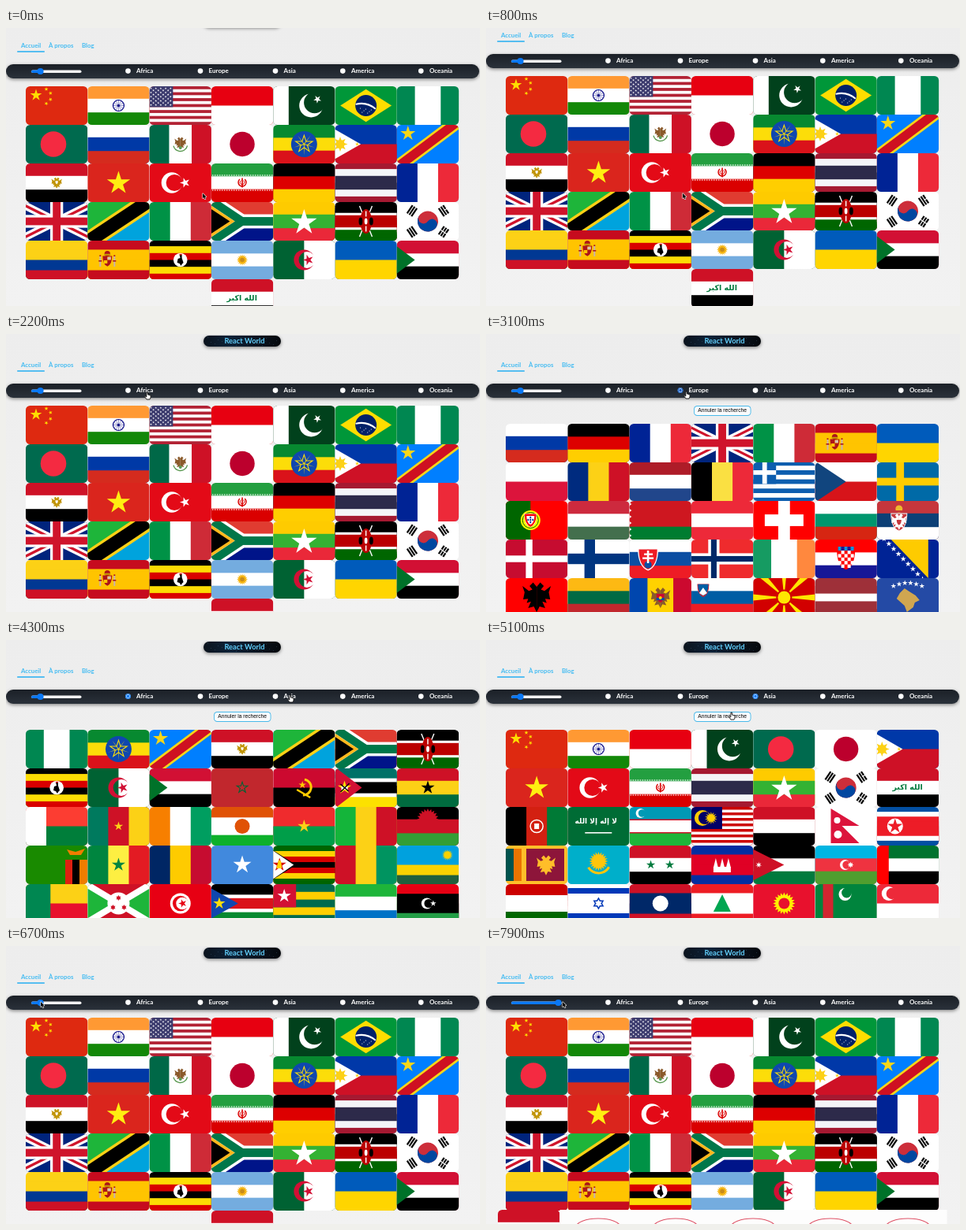
An HTML page with a canvas that plays this animation: 600 by 353 pixels, repeating every 8 s.

```html
<!DOCTYPE html>
<html lang="fr">
<head>
<meta charset="utf-8">
<title>React World</title>
<style>
html, body { margin: 0; width: 100%; height: 100%; overflow: hidden; background: #efefef; }
canvas { display: block; }
</style>
</head>
<body>
<canvas id="stage" width="600" height="353"></canvas>
<script>
const g = document.getElementById('stage').getContext('2d');
const W = 78.3, H = 49, CX = W / 2, CY = H / 2, LOOP = 8000;

// ---------- drawing helpers (colours are hex without '#') ----------
const ink = c => { g.fillStyle = '#' + c; };
const rect = (c, x, y, w, h) => { ink(c); g.fillRect(x, y, w, h); };
const fill = c => rect(c, 0, 0, W, H);
function disc(c, x, y, r) { ink(c); g.beginPath(); g.arc(x, y, r, 0, 7); g.fill(); }
function path(p) {
  g.beginPath();
  for (let i = 0; i < p.length; i += 2) g.lineTo(p[i], p[i + 1]);
}
function poly(c, ...p) { ink(c); path(p); g.fill(); }
function line(c, w, ...p) { g.strokeStyle = '#' + c; g.lineWidth = w; path(p); g.stroke(); }
function ring(c, w, x, y, r, a = 0, b = 7) {
  g.strokeStyle = '#' + c; g.lineWidth = w;
  g.beginPath(); g.arc(x, y, r, a, b); g.stroke();
}
function star(c, x, y, r, n = 5, k = .38, turn = 0) {
  const p = [];
  for (let i = 0; i < 2 * n; i++) {
    const a = turn - Math.PI / 2 + i * Math.PI / n, q = i % 2 ? r * k : r;
    p.push(x + q * Math.cos(a), y + q * Math.sin(a));
  }
  poly(c, ...p);
}
// a flag of the given ratio, centred so that it covers the card
function cover(ratio) {
  const w = Math.max(W, H * ratio), h = w / ratio;
  return { x: (W - w) / 2, y: (H - h) / 2, w, h };
}
function bands(s, across, ratio = 1.5) {
  const f = cover(ratio);
  s.split(' ').forEach((c, i, a) => {
    const p = i / a.length;
    rect(c, across ? f.x + p * f.w : 0, across ? 0 : f.y + p * f.h, f.w, f.h);
  });
}
const rows = (s, ratio) => bands(s, false, ratio), cols = (s, ratio) => bands(s, true, ratio);
function tri(c, tip, ratio = 1.5, inset = 0) {
  const f = cover(ratio);
  poly(c, f.x, f.y + inset, tip, CY, f.x, f.y + f.h - inset);
}
const cross = (c, w, x) => { rect(c, x - w / 2, 0, w, H); rect(c, 0, CY - w / 2, W, w); };
const slash = (c, w, ratio = 1.5, up = 1) => line(c, w, CX - 60, CY + up * 60 / ratio, CX + 60, CY - up * 60 / ratio);
function moon(c, x, y, r, dx, dy = 0, k = .8) {
  g.save();
  g.beginPath(); g.arc(x, y, r, 0, 7); g.clip();
  g.beginPath(); g.rect(0, 0, W, H); g.arc(x + dx, y + dy, r * k, 0, 2 * Math.PI);
  ink(c); g.fill('evenodd');
  g.restore();
}
function shield(c, x, y, r) {
  ink(c); g.beginPath(); g.moveTo(x - r, y - r); g.lineTo(x + r, y - r);
  g.quadraticCurveTo(x + r, y + r * .8, x, y + r * 1.2);
  g.quadraticCurveTo(x - r, y + r * .8, x - r, y - r); g.fill();
}
function eagle(c, x, y, r) {
  const half = [0, -.7, .25, -1, .5, -.75, .3, -.5, .55, -.4, 1, -.75, .85, -.3, .95, .2, .6, .15, .7, .45, .4, .35, .6, .8, .2, .7, 0, 1.1];
  for (const s of [-1, 1]) poly(c, ...half.map((v, i) => i % 2 ? y + v * r : x + s * v * r));
}
function script(s, c, y, size) {
  ink(c); g.font = `bold ${size}px "DejaVu Sans", sans-serif`;
  g.textAlign = 'center'; g.textBaseline = 'middle'; g.fillText(s, CX, y);
}
function taegeuk(r) {
  g.save(); g.translate(CX, CY); g.rotate(.588);
  disc('cd2e3a', 0, 0, r);
  ink('0047a0'); g.beginPath(); g.arc(0, 0, r, 0, Math.PI); g.fill();
  disc('cd2e3a', -r / 2, 0, r / 2); disc('0047a0', r / 2, 0, r / 2);
  g.restore();
  for (const sx of [-1, 1]) for (const sy of [-1, 1]) {
    g.save(); g.translate(CX + sx * 20, CY + sy * 13.4); g.rotate(sx * sy * -.98);
    for (const d of [-3.3, 0, 3.3]) rect('000', -6.2, d - 1.1, 12.4, 2.2);
    if (sx > 0) rect('fff', -.6, -5, 1.2, sy > 0 ? 10 : 4);
    g.restore();
  }
}
function unionJack() {
  fill('00247d');
  for (const [c, w] of [['fff', 9.8], ['cf142b', 3.3]]) { slash(c, w, 2); slash(c, w, 2, -1); }
  cross('fff', 16.3, CX); cross('cf142b', 9.8, CX);
}
function southAfrica() {
  rows('e03c31 001489');
  for (const [c, w] of [['fff', 17.4], ['007749', 10.4]]) {
    line(c, w, -12, -9.6, CX, CY, W, CY); line(c, w, -12, H + 9.6, CX, CY, W, CY);
  }
  tri('ffb81c', 29.7, 1.5, 6.3); tri('000', 23.5, 1.5, 10.5);
}
function usa() {
  rows('b22234 fff b22234 fff b22234 fff b22234 fff b22234 fff b22234 fff b22234', 1.9);
  rect('3c3b6e', 0, 0, 29.8, 26.4);
  for (let j = 0; j < 9; j++) for (let i = j % 2; i < 11; i += 2)
    star('fff', i * 3.1 - 4.3, 2.64 * (j + 1), 1.5);
}
function mozambique() {
  rows('007168 007168 007168 fff 000 000 000 fff fce100 fce100 fce100');
  tri('d21034', 34); star('fce100', 12, CY, 9);
  rect('fff', 8, 23, 8, 4); line('000', 1.3, 7, 30, 18, 19); line('000', 1.3, 7, 20, 17, 29);
}
function kenya() {
  rows('000 000 000 000 000 fff b00 b00 b00 b00 b00 fff 060 060 060 060 060');
  line('fff', 1.4, 31, 5, 47, 44); line('fff', 1.4, 47, 5, 31, 44);
  g.save(); g.translate(CX, CY); g.scale(.48, 1);
  disc('b00', 0, 0, 15.5); disc('000', -14, 0, 5); disc('000', 14, 0, 5);
  rect('fff', -1.5, -13, 3, 7); rect('fff', -1.5, 6, 3, 7); disc('fff', 0, 0, 4);
  g.restore();
}
function croatia() {
  rows('f00 fff 171796', 2); shield('f00', CX, CY, 11.5);
  for (let i = 1; i < 25; i += 2) rect('fff', CX - 10 + i % 5 * 4, 14 + (i / 5 | 0) * 4.4, 4, 4.4);
  for (let i = 0; i < 5; i++) rect(i % 2 ? '171796' : '0093dd', CX - 10 + i * 4, 9, 4, 5);
}
function macedonia() {
  fill('d20000');
  for (let i = 0; i < 8; i++) {
    const a = i * Math.PI / 4, b = .1;
    poly('ffe600', CX, CY, CX + 60 * Math.cos(a - b), CY + 60 * Math.sin(a - b),
      CX + 60 * Math.cos(a + b), CY + 60 * Math.sin(a + b));
  }
  disc('d20000', CX, CY, 10); disc('ffe600', CX, CY, 8);
}
function greece() {
  rows('0d5eaf fff 0d5eaf fff 0d5eaf fff 0d5eaf fff 0d5eaf');
  rect('0d5eaf', 0, 0, 29, 27.4); rect('fff', 11.6, 0, 5.8, 27.4); rect('fff', 0, 10, 29, 5.8);
}
function malaysia() {
  rows('c00 fff c00 fff c00 fff c00 fff c00 fff c00 fff c00 fff', 2);
  rect('010066', 0, 0, 39, 28); moon('fc0', 14, 14, 10, 3); star('fc0', 25, 14, 8, 14, .55);
}
const nordic = (x, bg, a, w, b, v) => () => { fill(bg); cross(a, w, x); if (b) cross(b, v, x); };
const tiers = (s, ratio) => () => rows(s, ratio), pales = (s, ratio) => () => cols(s, ratio);

const flags = {
  cn() {
    fill('de2910'); star('ffde00', 13, 11.4, 7.8);
    [[26, 3.6], [31.3, 8.8], [31.3, 16.7], [26, 21.9]].forEach(([x, y], i) => star('ffde00', x, y, 2.7, 5, .38, i));
  },
  in() {
    rows('ff9933 fff 138808'); ring('000080', 1.2, CX, CY, 7);
    for (let a = 0; a < 12; a++) slashSpoke(a * .5236);
    disc('000080', CX, CY, 1.5);
  },
  us: usa,
  id: tiers('e70011 fff'),
  pk() { fill('01411c'); rect('fff', 0, 0, 19.6, H); moon('fff', 48, CY, 15, 4.4, -3.8, .9); star('fff', 56, 16.5, 5.2, 5, .38, .7); },
  br() {
    fill('009739'); poly('fedd00', 6.7, CY, CX, 3.8, 71.6, CY, CX, 45.2); disc('012169', CX, CY, 13.5);
    ring('fff', 2, 33, 50, 28, -1.82, -.86);
    for (let i = 0; i < 7; i++) disc('fff', 32 + i * 2.3, 28 + i * 5 % 7, .6);
  },
  ng: pales('008751 fff 008751', 2),
  bd() { fill('006a4e'); disc('f42a41', 35, CY, 16.3); },
  ru: tiers('fff 0039a6 d52b1e'),
  mx() { cols('006847 fff ce1126', 1.75); ring('5b9a52', 1.4, CX, CY, 9, .2, 2.9); eagle('8a5a2b', CX, 23, 7.5); disc('5b9a52', CX, 29, 2); },
  jp() { fill('fff'); disc('bc002d', CX, CY, 15.7); },
  et() {
    rows('078930 fcdd09 da121a', 2); disc('0f47af', CX, CY, 16.5);
    star('fcdd09', CX, CY, 13); star('0f47af', CX, CY, 9.5); star('fcdd09', CX, CY, 14, 5, .06, Math.PI);
  },
  ph() {
    rows('0038a8 ce1126', 2); tri('fff', 32.6, 2); star('fcd116', 6.5, CY, 9.5, 8, .5); disc('fcd116', 6.5, CY, 5.5);
    star('fcd116', 28, CY, 2.8);
  },
  cd() { fill('007fff'); slash('f7d618', 17, 1.33); slash('ce1021', 11.5, 1.33); star('f7d618', 14, 11, 10); },
  eg() { rows('ce1126 fff 000'); eagle('c09300', CX, CY, 6.8); shield('fff', CX, 24, 1.8); },
  vn() { fill('da251d'); star('fe1', CX, 25, 15.5); },
  tr() { fill('e30a17'); moon('fff', 28.3, CY, 13.2, 3.3); star('fff', 45, CY, 6.6, 5, .38, -1.57); },
  ir() {
    rows('239f40 fff da0000', 1.75);
    for (let x = 1; x < W; x += 3) { rect('fff', x, 14.4, 1.6, 1.2); rect('fff', x, 33.4, 1.6, 1.2); }
    ring('da0000', 1.5, CX, 24, 5, -.9, 4.04); rect('da0000', CX - .8, 18.5, 1.6, 12); ring('da0000', 1, CX, 24, 2.8, -1, 4.1);
  },
  de: tiers('000 d00 ffce00', 1.67),
  th: tiers('a51931 f4f5f8 2d2a4a 2d2a4a f4f5f8 a51931'),
  fr: pales('002395 fff ed2939'),
  gb: unionJack,
  tz() { fill('00a3dd'); poly('1eb53a', 0, 0, W, 0, 0, H); slash('fcd116', 24); slash('000', 17); },
  it: pales('009246 fff ce2b37'),
  za: southAfrica,
  mm() { rows('fecb00 34b233 ea2839'); star('fff', CX, 26, 17); },
  ke: kenya,
  kr() { fill('fff'); taegeuk(13); },
  co: tiers('fcd116 fcd116 003893 ce1126'),
  es() {
    rows('c60b1e ffc400 ffc400 c60b1e'); shield('ad1519', 25, 25.5, 6);
    rect('ffc400', 25, 20.5, 4.5, 4); rect('d8c0b8', 25.3, 20.8, 4, 3.4); rect('ffc400', 20.5, 25, 4.5, 4);
    for (const x of [15, 33]) { rect('c8b1ae', x, 20, 2, 13); rect('ad1519', x - 1, 25, 4, 1.6); rect('ad1519', x, 18.4, 2, 1.6); }
    disc('ad1519', 25, 16.5, 3.6); rect('c8a000', 21, 16.8, 8, 2);
  },
  ug() {
    rows('000 fcdc04 d90000 000 fcdc04 d90000'); disc('fff', CX, CY, 8.8);
    poly('000', 35, 28, 36, 23, 39, 22, 38, 18, 41, 18, 41, 22, 43, 28, 41, 30, 40, 32, 38, 29); rect('d90000', 38, 16.8, 3, 1.6);
  },
  ar() { rows('74acdf fff 74acdf', 1.6); star('f6b40e', CX, CY, 7, 16, .65); disc('c98c1a', CX, CY, 2.8); },
  dz() { cols('006233 fff'); moon('d21034', CX, CY, 13, 3.6); star('d21034', 44.5, CY, 7, 5, .38, -1.57); },
  ua: tiers('005bbb ffd500'),
  sd() { rows('d21034 fff 000', 2); tri('007229', 22.8, 2); },
  iq() { rows('ce1126 fff 000'); script('الله اكبر', '007a3d', 25, 9.5); },

  pl: tiers('fff dc143c'),
  ro: pales('002b7f fcd116 ce1126'),
  nl: tiers('ae1c28 fff 21468b'),
  be: pales('000 fae042 ed2939'),
  gr: greece,
  cz() { rows('fff d7141a'); tri('11457e', CX); },
  se: nordic(29.4, '006aa7', 'fecc00', 9.8),
  pt() {
    fill('f00'); rect('060', 0, 0, 31.3, H); disc('ff0', 31.3, CY, 12.5); ring('060', 1, 31.3, CY, 10);
    shield('fff', 31.3, 24, 8); shield('f00', 31.3, 24, 7.4); shield('fff', 31.3, 24, 5);
    for (const d of [-3, 0, 3]) rect('039', 30.4 + d, 22.8, 1.8, 2.4);
    for (const d of [-3, 3]) rect('039', 30.4, 22.8 + d, 1.8, 2.4);
  },
  hu: tiers('cd2a3e fff 436f4d', 2),
  by() { rows('ce1720 ce1720 007c30', 2); for (let y = 0; y < H; y += 8) star('fff', 0, y + 4, 3, 4, .5); },
  at: tiers('ed2939 fff ed2939'),
  ch() { fill('f00'); rect('fff', CX - CY, CY - 7.4, H, 14.8); rect('fff', CX - 7.4, 0, 14.8, H); },
  bg: tiers('fff 00966e d62612', 1.67),
  rs() {
    rows('c6363c 0c4076 fff'); shield('fff', 28, 26, 10.5); shield('c6363c', 28, 26, 9.6);
    eagle('fff', 28, 26, 10); shield('c6363c', 28, 27, 3); disc('edb92e', 28, 10, 4.5); rect('c6363c', 24, 12, 8, 2);
  },
  dk: nordic(29.6, 'c60c30', 'fff', 8.4),
  fi: nordic(28, 'fff', '003580', 13.4),
  sk() {
    rows('fff 0b4ea2 ee1c25'); shield('fff', 23.5, 24, 13); shield('ee1c25', 23.5, 24, 11.6);
    disc('0b4ea2', 23.5, 32, 4.6); rect('fff', 22.2, 14, 2.6, 16); rect('fff', 18.5, 17.5, 11, 2.3); rect('fff', 16.5, 22.5, 14, 2.3);
  },
  no: nordic(28.5, 'ef2b2d', 'fff', 14.2, '002868', 7.1),
  ie: pales('169b62 fff ff883e', 2),
  hr: croatia,
  ba() { fill('002395'); poly('fecb00', 18, 0, 65, 0, 65, H); for (let i = 0; i < 9; i++) star('fff', 9 + i * 6.1, -1 + i * 6.4, 3.8); },
  al() { fill('f00'); eagle('000', CX, 23.5, 18); },
  lt: tiers('fdb913 006a44 c1272d', 1.67),
  md() {
    cols('0046ae ffd200 cc092f', 2); eagle('8a5a2b', CX, CY, 12.5); shield('cc092f', CX, 25, 5);
    rect('0046ae', CX - 5, 25, 10, 3); disc('ffd200', CX, 25, 2);
  },
  si() { rows('fff 005da4 ed1c24', 2); shield('ed1c24', 15, 15, 7.5); shield('005da4', 15, 14.5, 6.7); poly('fff', 10, 19, 15, 12, 20, 19, 15, 22); },
  mk: macedonia,
  lv: tiers('9e3039 9e3039 fff 9e3039 9e3039', 2),
  xk() {
    fill('244aa5'); poly('d0a650', 25, 26, 29, 19, 35, 13, 41, 17, 49, 22, 54, 28, 48, 31, 46, 37, 38, 43, 35, 35);
    for (let i = 0; i < 6; i++) star('fff', 21 + i * 7.2, 10 - Math.sin(i * .628) * 4, 3.6);
  },

  ma() { fill('c1272d'); star('006233', CX, CY, 9); star('c1272d', CX, CY, 5.5); },
  ao() { rows('cc092f 000'); ring('ffcb00', 3, 38, 24, 10, -1.4, 1.6); star('ffcb00', 37, 21, 5); line('ffcb00', 2.5, 30, 27, 47, 37); },
  mz: mozambique,
  gh() { rows('ce1126 fcd116 006b3f'); star('000', CX, CY, 9); },
  mg() { rows('fc3d32 007e3a'); rect('fff', 0, 0, 26, H); },
  cm() { cols('007a5e ce1126 fcd116'); star('fcd116', CX, CY, 6); },
  ci: pales('f77f00 fff 009e60'),
  ne() { rows('e05206 fff 0db02b', 1.17); disc('e05206', CX, CY, 9.5); },
  bf() { rows('ef2b2d 009e49'); star('fcd116', CX, CY, 8.5); },
  ml: pales('14b53a fcd116 ce1126'),
  mw() { rows('000 ce1126 339e35'); star('ce1126', CX, 16, 14, 20, .75); rect('ce1126', 0, 15.8, W, 17.4); },
  zm() { fill('198a00'); rect('de2010', 50, 18, 10, 31); rect('000', 59, 18, 10, 31); rect('ef7d00', 68, 18, 11, 31); poly('ef7d00', 52, 5, 63, 8, 75, 4, 70, 12, 56, 12); },
  sn() { cols('00853f fdef42 e31b23'); star('00853f', CX, CY, 9); },
  td: pales('002664 fecb00 c60c30'),
  so() { fill('4189dd'); star('fff', CX, CY, 12); },
  zw() { rows('006400 ffd200 d40000 000 d40000 ffd200 006400', 2); tri('000', 29, 2); tri('fff', 26, 2); star('d40000', 8, CY, 9); poly('ffd200', 4, 29, 7, 18, 10, 20, 11, 29); },
  gn: pales('ce1126 fcd116 009460'),
  rw() { rows('00a1de 00a1de fad201 20603d'); star('fad201', 64, 12, 7, 16, .6); },
  bj() { rows('fcd116 e8112d'); rect('008751', 0, 0, 31.3, H); },
  bi() {
    fill('1eb53a'); poly('ce1126', 0, 0, W, 0, 0, H, W, H); slash('fff', 8, 1.67); slash('fff', 8, 1.67, -1); disc('fff', CX, CY, 14);
    for (const [x, y] of [[0, -7], [-7, 5], [7, 5]]) star('ce1126', CX + x, CY + y, 3.5, 6, .58);
  },
  tn() { fill('e70013'); disc('fff', CX, CY, 13); moon('e70013', CX, CY, 9.8, 2.4); star('e70013', 42, CY, 5.5, 5, .38, -1.57); },
  ss() { rows('000 000 000 fff da121a da121a da121a fff 078930 078930 078930', 2); tri('0f47af', 34, 2); star('fcdd09', 10, CY, 8); },
  tg() { rows('006a4e ffce00 006a4e ffce00 006a4e', 1.6); rect('d21034', 0, 0, 29, 29.4); star('fff', 14, 15, 9); },
  sl: tiers('1eb53a fff 0072c6'),
  ly() { rows('e70013 000 000 239e46', 2); moon('fff', 38, CY, 7, 2.2); star('fff', 46, CY, 4); },

  af() { cols('000 d32011 007a36'); ring('fff', 1.5, CX, CY, 8); rect('fff', CX - 3, 21, 6, 7); },
  sa() { fill('006c35'); script('لا إله إلا الله', 'fff', 19, 9); rect('fff', 22, 32, 34, 1.6); },
  uz() { rows('0099b5 fff 1eb53a', 2); rect('ce1126', 0, 15.5, W, 1.5); rect('ce1126', 0, 32, W, 1.5); moon('fff', 14, 8, 6, 2); },
  my: malaysia,
  ye: tiers('ce1126 fff 000'),
  np() { fill('fff'); poly('dc143c', 20, 2, 56, 24, 34, 24, 56, 46, 20, 46); disc('fff', 29, 35, 5); disc('fff', 28, 17, 4); },
  kp() { rows('024fa2 fff ed1c27 ed1c27 ed1c27 ed1c27 fff 024fa2', 2); disc('fff', 23, CY, 10); star('ed1c27', 23, CY, 10); },
  lk() { fill('ffbe29'); rect('00534e', 0, 4, 10, 41); rect('eb7400', 10, 4, 10, 41); rect('8d153a', 26, 4, 48, 41); eagle('ffbe29', 51, CY, 12); },
  kz() { fill('00afca'); star('fec50c', CX, 20, 12, 20, .7); ring('fec50c', 3, CX, 20, 15, .5, 2.6); },
  sy() { rows('ce1126 fff 000'); star('007a3d', 27, CY, 6); star('007a3d', 51, CY, 6); },
  kh() { rows('032ea1 e00025 e00025 032ea1'); rect('fff', 28, 27, 22, 7); for (const x of [31, CX, 47]) poly('fff', x - 3, 28, x, 16, x + 3, 28); },
  jo() { rows('000 fff 007a3d', 2); tri('ce1126', CX, 2); star('fff', 7, CY, 4, 7); },
  az() { rows('00b5e2 ef3340 509e2f', 2); moon('fff', 38, CY, 6.5, 2); star('fff', 45, CY, 4, 8, .5); },
  ae() { rows('00732f fff 000', 2); rect('f00', 0, 0, 15, H); },
  tj: tiers('c00 c00 fff fff fff 060 060', 2),
  il() { fill('fff'); rect('0038b8', 0, 5, W, 7); rect('0038b8', 0, 37, W, 7); star('0038b8', CX, CY, 8, 6, .58); star('fff', CX, CY, 5, 6, .58); },
  la() { rows('ce1126 002868 002868 ce1126'); disc('fff', CX, CY, 10); },
  lb() { rows('ed1c24 fff fff ed1c24'); poly('00a651', CX, 13, 50, 35, 28, 35); },
  kg() { fill('e8112d'); star('ffef00', CX, CY, 14, 20, .75); disc('e8112d', CX, CY, 7); },
  tm() { fill('00843d'); rect('d22630', 10, 0, 13, H); moon('fff', 38, 13, 8, 2, -2); },
  sg() { rows('ed2939 fff'); moon('fff', 15, 12, 9, 4); }
};
function slashSpoke(a) {
  line('000080', .4, CX, CY, CX + 6.6 * Math.cos(a), CY + 6.6 * Math.sin(a));
}

const lists = {
  all: 'cn in us id pk br ng bd ru mx jp et ph cd eg vn tr ir de th fr gb tz it za mm ke kr co es ug ar dz ua sd iq',
  europe: 'ru de fr gb it es ua pl ro nl be gr cz se pt hu by at ch bg rs dk fi sk no ie hr ba al lt md si mk lv xk',
  africa: 'ng et cd eg tz za ke ug dz sd ma ao mz gh mg cm ci ne bf ml mw zm sn td so zw gn rw bj bi tn ss tg sl ly',
  asia: 'cn in id pk bd jp ph vn tr ir th mm kr iq af sa uz my ye np kp lk kz sy kh jo az ae tj il la lb kg tm sg'
};
for (const k in lists) lists[k] = lists[k].split(' ');

// ---------- page ----------
const clamp = v => Math.max(0, Math.min(1, v));
const ease = (t, a, b) => { const p = clamp((t - a) / (b - a)); return p * p * (3 - 2 * p); };

function text(s, x, y, size, color, align = 'left', font = 'Lato, sans-serif', weight = 'bold') {
  g.font = `${weight} ${size}px ${font}`;
  g.textAlign = align; g.textBaseline = 'middle'; g.fillStyle = color;
  g.fillText(s, x, y);
}
function box(x, y, w, h, r, color) {
  g.beginPath(); g.roundRect(x, y, w, h, r); g.fillStyle = color; g.fill();
}
function shadowed(draw) {
  g.save();
  g.shadowColor = 'rgba(0,0,0,.45)'; g.shadowBlur = 4; g.shadowOffsetY = 1.5;
  draw(); g.restore();
}
function card(id, x, y, scale = 1) {
  g.save();
  g.translate(x + CX, y + CY); g.scale(scale, scale); g.translate(-CX, -CY);
  g.beginPath(); g.roundRect(0, 0, W, H, 5.5); g.clip();
  flags[id]();
  g.restore();
}

function header() {
  const sky = g.createLinearGradient(250, 0, 348, 0);
  [[0, '#0a121c'], [.35, '#0d2238'], [.7, '#0b1420'], [1, '#04070b']].forEach(s => sky.addColorStop(...s));
  shadowed(() => box(250, 2, 98, 14, 7, sky));
  for (let i = 0; i < 24; i++) {
    g.fillStyle = 'rgba(130,180,220,.3)';
    g.fillRect(255 + i * 37 % 88, 4 + i * 17 % 11, .8, .8);
  }
  text('React World', 302, 9.3, 9.3, '#61cdfa', 'center');
  [['Accueil', 19], ['À propos', 54], ['Blog', 96]].forEach(([s, x]) => text(s, x, 39.2, 7.8, '#45bcf2'));
  box(14, 46.3, 35, 1.5, .8, '#25aef2');
}

function toolbar(mode, slider, pressed) {
  const metal = g.createLinearGradient(0, 63, 0, 81);
  metal.addColorStop(0, '#1b2027'); metal.addColorStop(1, '#2a313a');
  shadowed(() => box(0, 63, 599, 18, 9, metal));
  box(32, 70.4, 63.5, 3.6, 1.8, '#f4f4f4');
  box(32, 70.4, slider - 32, 3.6, 1.8, '#0a78f5');
  disc('0a78f5', slider, 72, 4.1);
  [['Africa', 154.5], ['Europe', 246], ['Asia', 341], ['America', 426.3], ['Oceania', 525.3]].forEach(([s, x]) => {
    const blue = pressed ? '0b58c4' : '0a78f5';
    disc('fdfdfd', x, 71.6, 3.3);
    if (s.toLowerCase() === mode) {
      ring(blue, 1.1, x, 71.6, 2.9);
      disc(blue, x, 71.6, 1.8);
    }
    text(s, x + 10.6, 72, 8, '#fff');
  });
}

function grid(mode, wide) {
  const top = mode === 'all' ? 91 : 114;
  lists[mode].forEach((id, i) => {
    const row = i / 7 | 0, x = 25 + i % 7 * W, y = top + row * H;
    if (i < 35) card(id, x, y);
    else card(id, wide ? 15 : 260, wide ? 335 : y);
  });
  if (!wide) return;
  rect('fdfdfd', 93.5, 335, 490, 20);
  for (let i = 0; i < 5; i++) {
    g.strokeStyle = '#df5468'; g.lineWidth = 1.2;
    g.beginPath(); g.ellipse(142 + i * 98, 357, 28, 11, 0, Math.PI, 2 * Math.PI); g.stroke();
  }
}

function details(amount) {
  if (amount <= 0) return;
  const x = 25 + 3 * W;
  card('id', x, 91, 1 + .14 * amount);
  g.save(); g.globalAlpha = amount;
  box(x - 5, 95, 89, 38, [0, 0, 5, 5], 'rgba(40,40,40,.52)');
  ['Indonésie', 'Jakarta', 'Pop : 273 523 621'].forEach((s, i) =>
    text(s, x + CX, 102.5 + i * 12.4, 7.9, 'rgba(255,255,255,.82)', 'center', 'Lato, sans-serif', 900));
  g.restore();
}

const route = [
  [0, 249, 210], [1000, 249, 210], [1700, 200, 110], [2100, 178, 74], [2400, 178, 74], [2850, 253, 73],
  [3200, 253, 73], [3700, 178, 73], [3900, 178, 73], [4300, 359, 70], [4700, 359, 70], [5250, 299, 97],
  [5500, 299, 97], [5700, 234, 86], [6600, 44, 71], [7300, 44, 71], [7800, 97, 71], [8000, 97, 71]
];
function pointerAt(t) {
  const i = route.findIndex(k => k[0] > t), a = route[i - 1], b = route[i], p = ease(t, a[0], b[0]);
  return [a[1] + (b[1] - a[1]) * p, a[2] + (b[2] - a[2]) * p];
}
function pointer(x, y, hand) {
  g.save(); g.translate(x, y); g.lineJoin = 'round';
  if (hand) {
    path([0, 0, 1.4, 0, 1.6, 3, 5.2, 4, 5, 7, 4, 9, 0, 9, -2.6, 5.6, -2, 4.8, -.2, 6]);
    g.closePath(); g.fillStyle = '#fff'; g.strokeStyle = '#111'; g.lineWidth = .9;
    g.fill(); g.stroke();
  } else {
    g.scale(.88, .88);
    path([0, 0, 0, 7.2, 1.7, 5.8, 2.9, 8.6, 4.2, 8, 3, 5.3, 5.2, 5.1]);
    g.closePath(); g.fillStyle = '#000'; g.strokeStyle = '#fff'; g.lineWidth = 1.2;
    g.stroke(); g.fill();
  }
  g.restore();
}

function modeAt(t) {
  if (t < 2900 || t >= 5500) return 'all';
  return t < 3800 ? 'europe' : t < 4600 ? 'africa' : 'asia';
}

function draw(t) {
  const mode = modeAt(t), [px, py] = pointerAt(t);
  const scroll = 17 + 10 * ease(t, 0, 300) + 3 * ease(t, 400, 800) - 30 * ease(t, 900, 1500);
  const back = g.createLinearGradient(0, 0, 0, 353);
  back.addColorStop(0, '#ededed'); back.addColorStop(1, '#f2f2f2');
  g.fillStyle = back; g.fillRect(0, 0, 600, 353);

  g.save(); g.translate(0, -scroll);
  header();
  toolbar(mode, t < 7300 ? 43.5 : Math.min(91.5, Math.max(43.5, px)), t < 3200);
  if (mode !== 'all') {
    box(263, 91, 72.5, 13, 4.5, '#49b9ea');
    box(263.9, 91.9, 70.7, 11.2, 3.8, '#fafbfc');
    text('Annuler la recherche', 299.2, 97.6, 6.7, '#000', 'center', '"Liberation Sans", sans-serif', 'normal');
  }
  grid(mode, t >= 7600);
  if (t >= 5500) details(ease(t, 5450, 5650) * (1 - ease(t, 5700, 6000)));
  g.restore();

  const onBar = py > 62 && py < 81 && px > 148;
  const onButton = mode !== 'all' && py > 90 && py < 104 && px > 263 && px < 335;
  pointer(px, py, onBar && t < 5500 || onButton);
}

const start = performance.now();
function tick() {
  const t = (performance.now() - start) % LOOP;
  draw(Math.floor(t / 100) * 100);
  requestAnimationFrame(tick);
}
tick();
</script>
</body>
</html>
```
